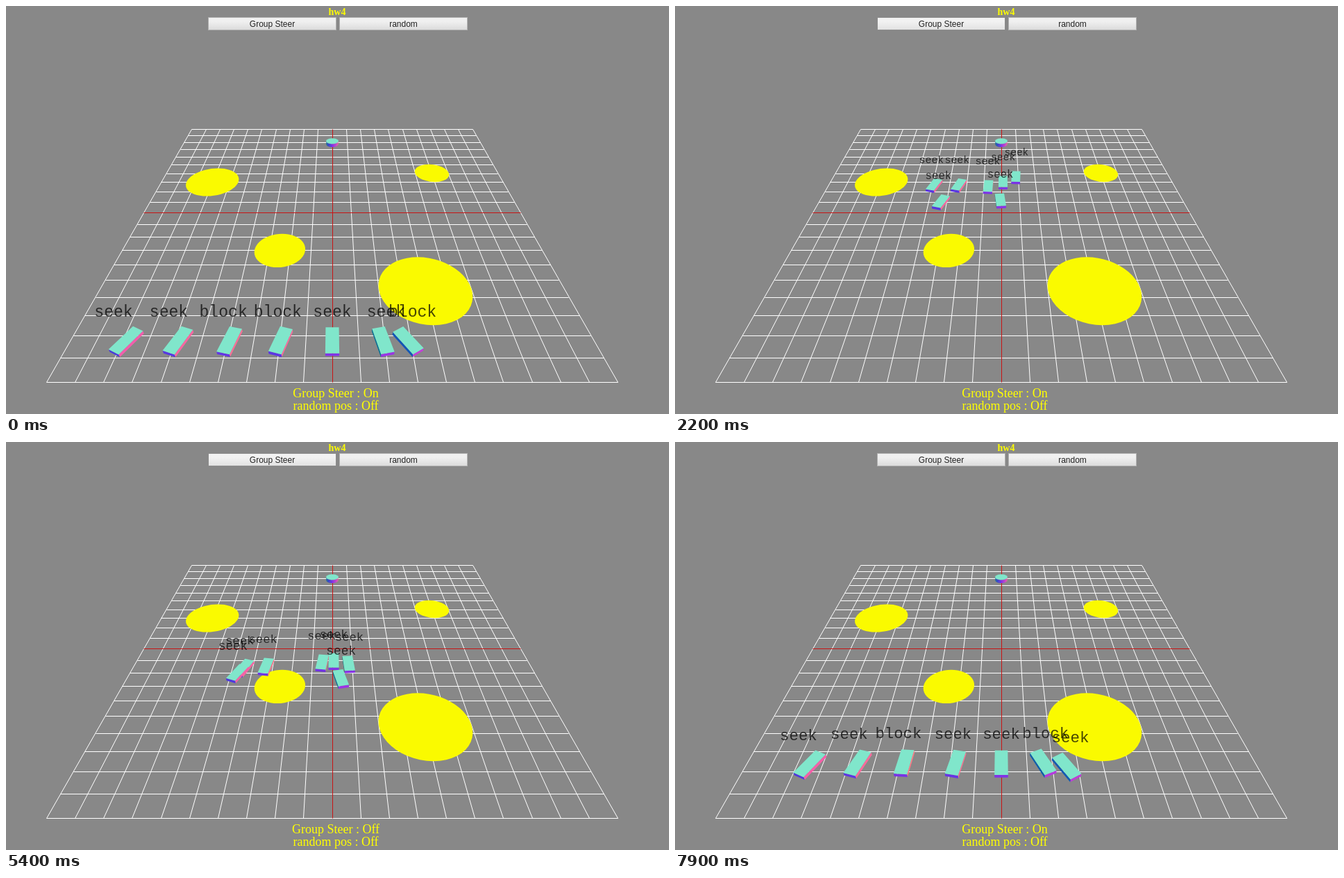
An HTML page with a canvas that plays this animation: 955x587 px, repeating every 8000 ms.

```html
<!DOCTYPE html>
<html lang="en">
<head>
<meta charset="utf-8">
<title>Steering demo</title>
<style>
html, body { margin: 0; width: 100%; height: 100%; overflow: hidden; background: #888; }
canvas { position: absolute; left: 0; top: 0; }
.line { position: absolute; text-align: center; color: #ff0; font: 18px/18px "Liberation Serif", "Times New Roman", serif; }
.title { left: 427px; top: 0; width: 100px; font-size: 14px; line-height: 17px; font-weight: bold; }
.status { left: 375px; width: 200px; }
.button {
  position: absolute; top: 16px; width: 185px; height: 19px; box-sizing: border-box;
  border: 1px solid #b0b0b0; background: linear-gradient(#f0f0f0 30%, #dcdcdc);
  color: #222; text-align: center; font: 12px/18px "Liberation Sans", Arial, sans-serif;
}
.hover { border-color: #8c8c8c; background: linear-gradient(#f2f2f2 30%, #e2e2e2); }
</style>
</head>
<body>
<canvas id="scene" width="955" height="587"></canvas>
<div class="line title">hw4</div>
<div class="button" id="steer" style="left:291px">Group Steer</div>
<div class="button" style="left:480px">random</div>
<div class="line status" id="status" style="top:548px"></div>
<div class="line status" style="top:566px">random pos : Off</div>
<script>
const ctx = document.getElementById('scene').getContext('2d');
const steer = document.getElementById('steer');
const statusLine = document.getElementById('status');

const LOOP = 8000, STEP = 100, RAD = Math.PI / 180;
const FOCUS = 640, CAM = [0, 14, 19];
const DIST = Math.hypot(...CAM), SIN = CAM[1] / DIST, COS = CAM[2] / DIST;

// Ground units are grid squares; z grows toward the viewer.
function project([x, y, z]) {
  const k = FOCUS / (DIST - z * COS - y * SIN);
  return [470 + x * k, 297.7 + (z * SIN - y * COS) * k, k];
}

// Agent poses are [x, z, heading in degrees].
const homes = [-8, -6, -4, -2, 0, 2, 3];
const startTurn = [33, 26, 21, 15, 0, -11, -14];
const start = homes.map((x, i) => [x, 8.45, startTurn[i]]);
const arrived = homes.map(x => [x * .12, -7.2 + .04 * Math.abs(x), -x * 2]);

const runs = [
  [
    [0, [[-7.85, 8.25, 26], [-5.87, 8.25, 19], [-3.91, 8.25, 13], [-1.96, 8.25, 16], [0, 8.25, 0], [1.93, 8.25, -12], [2.88, 8.25, -32]]],
    [1500, [[-5.11, 2.7, 23], [-4.52, 1.71, 0], [-3.77, 1.66, 9], [-.72, 1.99, 2], [-.03, 1.6, 4], [.48, .89, 0], [.54, 2.85, -9]]],
    [2200, [[-3.31, -.99, 19], [-3.89, -2.67, 17], [-2.46, -2.67, 17], [-.75, -2.52, 2], [.1, -2.99, 0], [.87, -3.55, 3], [-.05, -1.12, -5]]],
    [3000, arrived]
  ],
  [
    [3500, start],
    [4600, [[-6.52, 5.59, 21], [-5.01, 5.42, 15], [-3.98, 5.34, -6], [-1.27, 5.42, 11], [0, 5.3, 0], [1.44, 5.42, -7], [1.5, 6.08, -25]]],
    [6300, [[-2.34, -3.07, 24], [-2.93, -3.55, 23], [-1.9, -3.63, 23], [0, -4.15, 4], [.1, -4.25, 0], [.28, -4, -3], [-.14, -3, 0]]],
    [6900, arrived]
  ],
  [
    [7300, start],
    [7900, [[-7.5, 7.65, 24], [-5.64, 7.6, 16], [-3.82, 7.56, 4], [-1.79, 7.6, 11], [0, 7.6, 0], [1.64, 7.56, -25], [2.54, 7.76, -30]]]
  ]
];

// [agent, from, to]: times when an agent's way is blocked
const blocks = [
  [2, 0, 700], [3, 0, 900], [6, 0, 600],
  [0, 3500, 3600], [1, 3500, 3600], [2, 3500, 4900], [6, 3600, 4100], [5, 3700, 4200],
  [0, 7300, 7400], [1, 7300, 7400], [2, 7300, 8000], [6, 7400, 7800], [5, 7600, 8000]
];

const discs = [[4, 5.48, 2], [-2.5, 2.97, 1.21], [-7.03, -3.1, 1.52], [6.02, -4.08, 1.02]];

// Smooth curve through [time, value] points, starting slowly.
function curve(points, t) {
  const last = points.length - 1;
  if (t >= points[last][0]) return points[last][1];
  const slope = j => (points[j + 1][1] - points[j][1]) / (points[j + 1][0] - points[j][0]);
  const tangent = j => {
    if (j === 0) return .2 * slope(0);
    if (j === last) return last === 1 ? 1.8 * slope(0) : 0;
    const before = points[j][0] - points[j - 1][0], after = points[j + 1][0] - points[j][0];
    return (slope(j - 1) * after + slope(j) * before) / (before + after);
  };
  let j = 0;
  while (t >= points[j + 1][0]) j++;
  const [[t0, a], [t1, b]] = points.slice(j, j + 2);
  const d = t1 - t0, u = (t - t0) / d, v = 1 - u;
  return a + (b - a) * u * u * (3 - 2 * u) + d * u * v * (v * tangent(j) - u * tangent(j + 1));
}

function pose(i, t) {
  const run = runs.filter(r => r[0][0] <= t).pop();
  return [0, 1, 2].map(c => curve(run.map(([time, rows]) => [time, rows[i][c]]), t));
}

function polygon(points, color) {
  ctx.beginPath();
  points.forEach(p => ctx.lineTo(...project(p).slice(0, 2)));
  ctx.closePath();
  ctx.fillStyle = color;
  ctx.fill();
}

// Colour of a face follows its direction as seen by the camera.
function face(points, [nx, ny, nz]) {
  const p = points[0];
  if (nx * (CAM[0] - p[0]) + ny * (CAM[1] - p[1]) + nz * (CAM[2] - p[2]) <= 0) return;
  const rgb = [nx, ny * COS - nz * SIN, ny * SIN + nz * COS].map(n => Math.round(127.5 + 127.5 * n));
  polygon(points, `rgb(${rgb})`);
}

// Upright solid over a ground outline, centred on the ground plane.
function prism(outline, half) {
  outline.forEach(([x, z], i) => {
    const [x2, z2] = outline[(i + 1) % outline.length];
    const len = Math.hypot(x2 - x, z2 - z);
    face([[x, half, z], [x2, half, z2], [x2, -half, z2], [x, -half, z]], [(z2 - z) / len, 0, (x - x2) / len]);
  });
  face(outline.map(([x, z]) => [x, half, z]), [0, 1, 0]);
}

const circle = (x, z, r, n) => Array.from({ length: n }, (_, i) => {
  const a = i / n * 2 * Math.PI;
  return [x + r * Math.cos(a), z + r * Math.sin(a)];
});

function box([x, z, deg]) {
  const s = Math.sin(deg * RAD), c = Math.cos(deg * RAD);
  const corner = (side, ahead) => [x + side * c + ahead * s, z + side * s - ahead * c];
  prism([corner(-.26, .6), corner(.26, .6), corner(.26, -.6), corner(-.26, -.6)], .08);
}

function label([x, z], text) {
  const [px, py, k] = project([x, 1.7, z]);
  const size = k * .575;
  ctx.font = `${size}px "Courier New", "Liberation Mono", monospace`;
  ctx.fillStyle = 'rgba(0,0,0,.72)';
  ctx.fillText(text, px, py + size * .33);
}

function line(a, b, color) {
  const [x1, y1] = project(a), [x2, y2] = project(b);
  const snap = v => Math.floor(v) + .5;
  ctx.strokeStyle = color;
  ctx.beginPath();
  ctx.moveTo(snap(x1), snap(y1));
  ctx.lineTo(snap(x2), snap(y2));
  ctx.stroke();
}

function draw(t) {
  ctx.fillStyle = '#888';
  ctx.fillRect(0, 0, 955, 587);
  ctx.lineWidth = 1;
  ctx.textAlign = 'center';
  for (let i = -10; i <= 10; i++) {
    if (!i) continue;
    line([i, 0, -10], [i, 0, 10], '#fff');
    line([-10, 0, i], [10, 0, i], '#fff');
  }
  line([0, 0, -10], [0, 0, 10], '#c81414');
  line([-10, 0, 0], [10, 0, 0], '#c81414');

  for (const [x, z, r] of discs) polygon(circle(x, z, r, 48).map(([a, b]) => [a, 0, b]), '#fafa00');
  prism(circle(0, -8, .41, 24), .12);

  const agents = homes.map((_, i) => ({
    at: pose(i, t),
    text: blocks.some(([n, from, to]) => n === i && t >= from && t < to) ? 'block' : 'seek'
  })).sort((a, b) => a.at[1] - b.at[1]);
  agents.forEach(a => box(a.at));
  agents.forEach(a => label(a.at, a.text));

  statusLine.textContent = 'Group Steer : ' + (t >= 4100 && t < 7600 ? 'Off' : 'On');
  steer.classList.toggle('hover', t >= 2000 && t < 7800);
}

const origin = performance.now();
function tick() {
  const t = (performance.now() - origin) % LOOP;
  draw(Math.floor(t / STEP) * STEP);
  requestAnimationFrame(tick);
}
tick();
</script>
</body>
</html>
```
